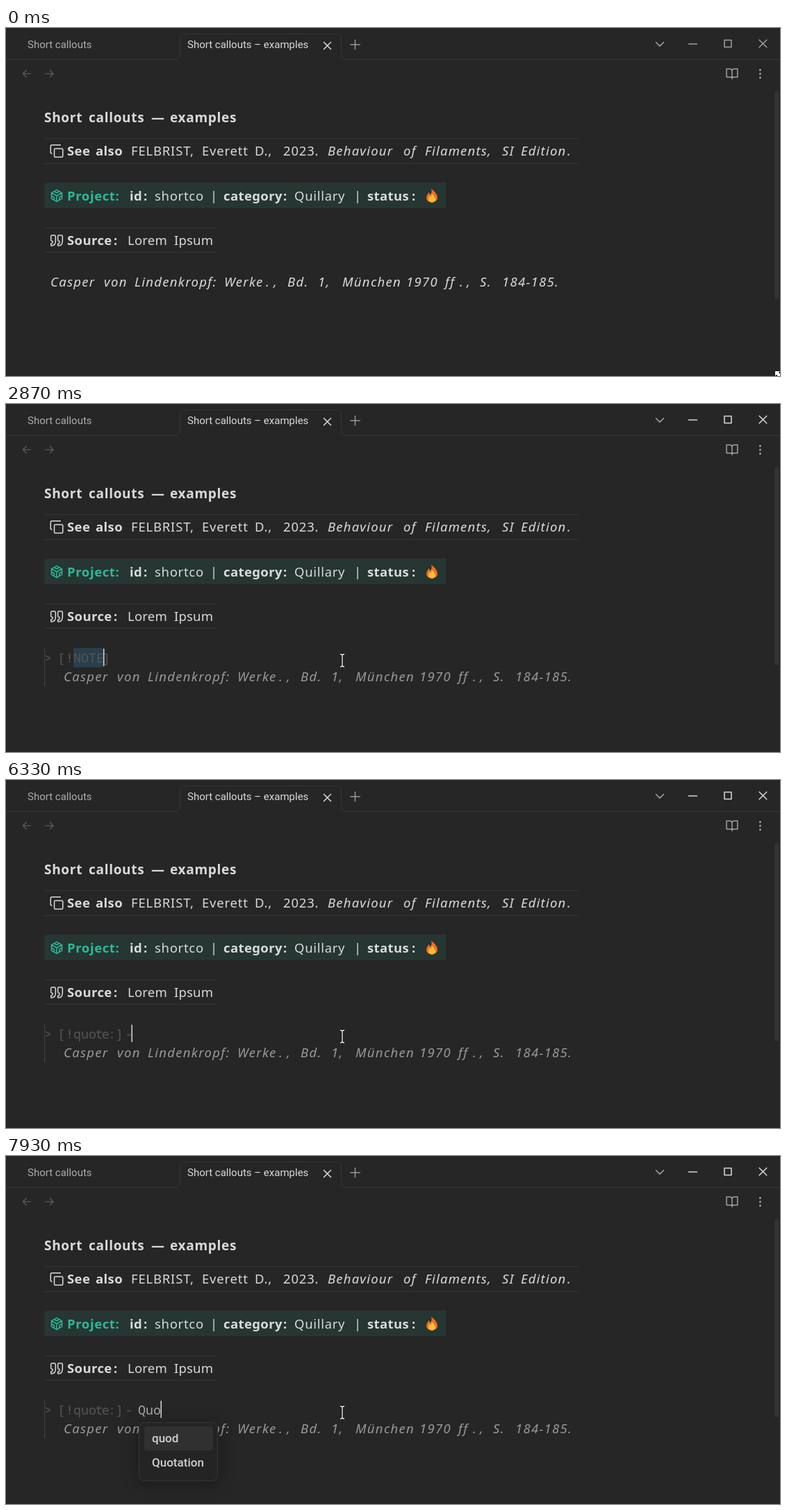
Write an HTML page with a canvas that moves like this. It is 1114 px wide and 502 px high and loops after 8 s.

```html
<!DOCTYPE html>
<html lang="en">
<head>
<meta charset="utf-8">
<title>Short callouts</title>
<style>
  html, body { margin: 0; width: 100%; height: 100%; overflow: hidden; background: #262626; }
  canvas { display: block; width: 1114px; height: 502px; }
</style>
</head>
<body>
<canvas id="stage" width="1114" height="502"></canvas>
<script>
const W = 1114, H = 502;
const stage = document.getElementById('stage').getContext('2d');
const layer = Object.assign(document.createElement('canvas'), { width: W, height: H }).getContext('2d');
let ctx = stage;

const LOOP = 8000, FRAME = 1000 / 15;

const SANS = '"Noto Sans", "Open Sans", sans-serif';
const MONO = '18.3px "Noto Sans Mono", "DejaVu Sans Mono", monospace';
const UI = 'Roboto, "Open Sans", sans-serif';
const BODY = '18.5px ' + SANS;
const BOLD = 'bold ' + BODY;
const ITALIC = 'italic ' + BODY;
const LIST = '500 17px ' + UI;

const BG = '#262626', TEXT = '#dadada', MUTED = '#999999', FAINT = '#555555';
const LINE = '#363636', TEAL = '#2eb89a', SELECT = '#293f4b';

// time, typed callout type, typed title, caret x
const TYPING = [
  [2870, 'NOTE', '', 140.5], [4130, 'q', '', 108], [4200, 'qu', '', 119],
  [4530, 'quo', '', 130], [4800, 'quot', '', 138], [4870, 'quote', '', 149],
  [5330, 'quote:', '', 159], [5930, 'quote:', '', 170], [6330, 'quote:', '', 181],
  [6600, 'quote:', '', 190], [7000, 'quote:', 'Q', 201], [7530, 'quote:', 'Qu', 212],
  [7800, 'quote:', 'Quo', 223]
];

const quoteMark = x => `M${x + 1} 21c3 0 7-1 7-8V5c0-1.25-.756-2-2-2H${x + 2}c-1.25 0-2 .75-2 2v6c0 1.25.75 2 2 2 1 0 1 0 1 1v1c0 1-1 2-2 2s-1 0-1 1v2c0 1 0 1 1 1z`;
const ICONS = {
  copy: 'M10 8H20a2 2 0 0 1 2 2V20a2 2 0 0 1-2 2H10a2 2 0 0 1-2-2V10a2 2 0 0 1 2-2zM4 16a2 2 0 0 1-2-2V4a2 2 0 0 1 2-2H18',
  box: 'M12 2L21 7V17L12 22L3 17V7ZM3 7L12 12L21 7M12 12V22M7.5 4.5L12 7L16.5 4.5M7.5 19.5V14.5L3 12M21 12L16.5 14.5V19.5',
  quote: quoteMark(2) + quoteMark(14),
  message: 'M21 15a2 2 0 0 1-2 2H7l-4 4V5a2 2 0 0 1 2-2H19a2 2 0 0 1 2 2ZM8 12a2 2 0 0 0 2-2V8H8M14 12a2 2 0 0 0 2-2V8H14',
  left: 'M20 12H4M11 5L4 12L11 19',
  right: 'M4 12H20M13 5L20 12L13 19',
  book: 'M2 3H8a4 4 0 0 1 4 4V21a3 3 0 0 0-3-3H2ZM22 3H16a4 4 0 0 0-4 4V21a3 3 0 0 1 3-3H22Z',
  tags: 'M9 5H2V12L8.3 18.3a2 2 0 0 0 2.5 0L15 14a2 2 0 0 0 0-3ZM6 9V9.01M15 5L21 11a3 3 0 0 1 0 4L17 19',
  cross: 'M4 4L20 20M20 4L4 20',
  plus: 'M12 2V22M2 12H22',
  chevron: 'M3 8L12 17L21 8',
  minus: 'M3 12H21',
  square: 'M4 4H20V20H4Z'
};

function text(str, x, y, font, color, gap = 0) {
  ctx.font = font;
  ctx.fillStyle = color;
  ctx.letterSpacing = gap + 'px';
  ctx.fillText(str, x, y);
}

const words = (list, y, font, color, gap, dx = 0) =>
  list.forEach(([x, str]) => text(str, x + dx, y, font, color, gap));

function rect(x, y, w, h, color) {
  ctx.fillStyle = color;
  ctx.fillRect(x, y, w, h);
}

function round(x, y, w, h, r, color) {
  ctx.beginPath();
  ctx.roundRect(x, y, w, h, r);
  ctx.fillStyle = color;
  ctx.fill();
}

function disc(x, y, r, color) {
  ctx.beginPath();
  ctx.arc(x, y, r, 0, 7);
  ctx.fillStyle = color;
  ctx.fill();
}

function icon(name, cx, cy, size, color, weight = 1.5) {
  const k = size / 24;
  ctx.save();
  ctx.translate(cx - size / 2, cy - size / 2);
  ctx.scale(k, k);
  ctx.strokeStyle = color;
  ctx.lineWidth = weight / k;
  ctx.lineCap = ctx.lineJoin = 'round';
  ctx.stroke(new Path2D(ICONS[name]));
  ctx.restore();
}

function shape(cx, cy, path, color) {
  ctx.save();
  ctx.translate(cx, cy);
  ctx.fillStyle = color;
  ctx.fill(new Path2D(path));
  ctx.restore();
}

// Paints on a separate layer, then blends it as one group.
function group(alpha, paint) {
  ctx = layer;
  ctx.clearRect(0, 0, W, H);
  ctx.save();
  paint();
  ctx.restore();
  ctx = stage;
  ctx.globalAlpha = alpha;
  ctx.drawImage(layer.canvas, 0, 0);
  ctx.globalAlpha = 1;
}

function drawWindow(t) {
  rect(0, 0, W, H, BG);
  ctx.strokeStyle = LINE;
  ctx.lineWidth = 1;
  ctx.stroke(new Path2D('M0 45.5H243Q250.5 45.5 250.5 38V16Q250.5 8.5 258 8.5H474Q482.5 8.5 482.5 16V38Q482.5 45.5 490 45.5H1114'));
  text('Short callouts', 31, 28.5, '15px ' + UI, '#ababab');
  text('Short callouts – examples', 261, 28.5, '15px ' + UI, TEXT);

  const control = t < 1200 ? '#a0a0a0' : TEXT;
  icon('cross', 462.5, 25.5, 15, TEXT);
  icon('plus', 502.5, 24, 16, MUTED);
  icon('chevron', 941, 23, 15, '#a0a0a0');
  icon('minus', 988.5, 23, 16, control);
  icon('square', 1039, 22.5, 15, control);
  icon('cross', 1089.5, 22.5, 16, control);
  icon('left', 30, 66, 17, FAINT);
  icon('right', 62.5, 66, 17, FAINT);
  icon('book', 1045, 66, 19, '#a0a0a0');
  for (const y of [60.5, 66, 71.5]) disc(1085.5, y, 1.5, '#a0a0a0');
  round(1106, 91, 6, t < 2870 ? 300 : 286, 3, '#333333');
}

function flame(x, y) {
  shape(x, y, 'M-1-10C5-6 8-1 8 3C8 7 4 9.5 0 9.5S-8 7-8 3C-8 0-6-3-4-5C-4-3-3-2-2-2C0-4 0-7-1-10Z', '#f26b21');
  shape(x, y, 'M0-3C3 0 5 2 5 5C5 8 2 9.5 0 9.5S-5 8-5 5C-5 3-4 1-3 0C-2 2-1 2 0-3Z', '#fdbd3f');
}

function drawNote() {
  words([[55, 'Short'], [119, 'callouts'], [209, '—'], [236, 'examples']], 135.5, 'bold 19px ' + SANS, TEXT, 0.7);

  for (const [y, w] of [[159, 769], [195, 769], [288, 249], [323, 249]]) rect(55, y, w, 1, LINE);
  icon('copy', 73, 177.5, 21, TEXT);
  words([[88, 'See'], [129, 'also']], 184, BOLD, TEXT, 0.4);
  words([[180, 'FELBRIST,'], [282, 'Everett'], [358, 'D.,'], [399, '2023.']], 184, BODY, TEXT, 0.8);
  words([[463, 'Behaviour'], [572, 'of'], [603, 'Filaments,'], [714, 'SI'], [741, 'Edition']], 184, ITALIC, TEXT, 1.2);
  text('.', 807, 184, BODY, TEXT);

  rect(55, 223, 578, 37, '#263632');
  icon('box', 73, 242, 20, TEAL);
  text('Project:', 88, 248.5, BOLD, TEAL, 0.6);
  words([[178, 'id'], [198, ':'], [313, 'category'], [399, ':'], [520, 'status'], [584, ':']], 248.5, BOLD, TEXT, 0.4);
  words([[214, 'shortco'], [294, '|'], [415, 'Quillary'], [501, '|']], 248.5, BODY, TEXT, 0.7);
  flame(613, 242);

  icon('quote', 73, 306.5, 20, TEXT);
  words([[88, 'Source'], [155, ':']], 312.5, BOLD, TEXT, 0.4);
  words([[175, 'Lorem'], [242, 'Ipsum']], 312.5, BODY, TEXT, 0.2);
}

const CITATION = [[64, 'Casper'], [141, 'von'], [185, 'Lindenkropf:'], [314, 'Werke'], [374, '.'], [385, ','],
  [405, 'Bd.'], [449, '1,'], [484, 'München'], [576, '1970'], [632, 'ff'], [653, '.'], [663, ','],
  [682, 'S.'], [714, '184-185.']];

const citation = (dx, y, color) => words(CITATION, y, ITALIC, color, 1.3, dx);

function caret(x, age) {
  if (age % 1200 < 600) rect(x - 0.5, 353, 1.5, 25, TEXT);
}

function drawPlain(t) {
  const raw = t >= 1330, all = t >= 1530;
  if (all) rect(55, 352, 770, 28, SELECT);
  if (raw) words([[64, '*'], [814, '*']], 373, 'italic ' + MONO, FAINT);
  citation(raw ? 11 : 0, 372.5, TEXT);
  if (t >= 1270) caret(all ? 824.5 : 482.5, t - (all ? 1530 : 1270));
}

function drawCallout(t) {
  const [since, kind, title, x] = TYPING.findLast(s => t >= s[0]);
  const code = (str, cx, color = FAINT) => text(str, cx, 372.5, MONO, color);
  rect(55, 352, 1, 55, '#434343');
  if (kind === 'NOTE') {
    rect(97, 352, 44, 28, SELECT);
    code(kind, 97);
  } else {
    code(kind.slice(0, 3), 97);
    [...kind.slice(3)].forEach((c, i) => code(c, 128.5 + i * 9.3));
  }
  code('>', 55);
  code('[', 74);
  code('!', 86);
  code(']', Math.min(x, 159) - 1);
  if (t >= 6330) code('-', 171.5);
  code(title, 190, '#aaaaaa');
  citation(19, 400, MUTED);
  caret(x, t - since);
}

function panel(x, y, w, h) {
  ctx.save();
  ctx.shadowColor = 'rgba(0,0,0,.3)';
  ctx.shadowBlur = 24;
  ctx.shadowOffsetY = 4;
  round(x, y, w, h, 8, '#242424');
  ctx.restore();
  ctx.strokeStyle = LINE;
  ctx.lineWidth = 1;
  ctx.beginPath();
  ctx.roundRect(x + 0.5, y + 0.5, w - 1, h - 1, 8);
  ctx.stroke();
}

function menu(x, y, w, items) {
  panel(x, y, w, 15 + items.length * 35);
  round(x + 8, y + 6, w - 15, 35, 4, '#303030');
  items.forEach(([name, mark], i) => {
    const cy = y + 23.5 + i * 35;
    if (mark) icon(mark, x + 29, cy, 15, '#b0b0b0', 1.2);
    text(name, x + (mark ? 45 : 19), cy + 5.5, LIST, '#d0d0d0');
  });
}

const letters = (str, font) => y => text(str, 380, y + 8, font, '#c8c8c8');
const EMOJI = {
  qatar: letters('QA', '500 14px ' + UI),
  squid(y) {
    shape(389, y, 'M0-9C5-6 5-2 4 1L8-1L6 4L9 8L4 6L3 9L0 6L-3 9L-4 6L-9 8L-6 4L-8-1L-4 1C-5-2-5-6 0-9Z', '#e0246e');
  },
  queen(y) {
    shape(389, y + 3, 'M-9-5L-5-1L-3-7L0-2L3-7L5-1L9-5L7 7H-7Z', '#f2a72e');
    rect(383, y + 7, 12, 1.5, '#a15f16');
  },
  quiet(y) {
    disc(389, y + 1, 9, '#f2a42e');
    rect(383, y - 2, 4, 1.5, '#6b431d');
    rect(391, y - 2, 4, 1.5, '#6b431d');
    shape(389, y + 4, 'M-5-1Q0-3 5-1L4 3Q0 5-4 3Z', '#a9651c');
  },
  iraq: letters('IQ', '15px "Noto Serif", serif'),
  question: y => text('?', 383.5, y + 8, '900 21px ' + UI, '#e8283d'),
  aquarius(y) {
    round(381, y - 7, 17, 17, 3, '#8a4fd0');
    ctx.strokeStyle = '#eeeeee';
    ctx.lineWidth = 1.5;
    for (const d of [-1, 4]) {
      ctx.beginPath();
      for (let i = 0; i < 7; i++) ctx.lineTo(383 + i * 2.1, y + d + (i % 2 ? -1.5 : 1.5));
      ctx.stroke();
    }
  },
  mosque(y) {
    shape(389, y, 'M-9 9V-4L-7.5-7L-6-4V2H-5Q-4-3 0-6Q4-3 5 2H6V-4L7.5-7L9-4V9H3V5Q0 1-3 5V9Z', '#c9a156');
    disc(389, y - 1, 3, '#e6a126');
  },
  bouquet(y) {
    shape(389, y, 'M-8 7Q-6-4 3-6L8 7Q1 10-8 7Z', '#3f9a55');
    disc(386, y, 3, '#e1457a');
    disc(392, y - 3, 3, '#ec6b8d');
    disc(392, y + 3, 2.5, '#f2b43a');
  },
  squirrel(y) {
    shape(389, y, 'M-7 9Q-9-7 1-7Q0 0 2 1L5-3L8 0L4 3V9Z', '#b8703c');
  },
  mosquito(y) {
    shape(389, y, 'M-8 7L0-1L-6-7L2-2L7-7L4 0L8 4L2 2L-2 7L0 2Z', '#8b9aa3');
  }
};

function emojiMenu(query) {
  const names = Object.keys(EMOJI).filter(n => n.includes(query)).slice(0, 9);
  panel(150, 12, 284, 335);
  ctx.beginPath();
  ctx.roundRect(150, 12, 284, 334, 8);
  ctx.clip();
  round(157, 19, 257, 37, 4, '#303030');
  round(424, 13, 8, 164, 4, '#323232');
  names.forEach((name, i) => {
    const y = 36 + i * 38, at = name.indexOf(query), end = at + query.length;
    let x = 171;
    [name.slice(0, at), query, name.slice(end)].forEach((part, k) => {
      text(part, x, y + 5.5, LIST, k === 1 ? '#858585' : '#dadada');
      x += ctx.measureText(part).width;
    });
    if (name === 'queen' || name === 'quiet') icon('tags', x + 14, y + 1, 17, '#999999', 1.2);
    EMOJI[name](y);
  });
}

const fade = age => Math.max(0, Math.min(1, 0.1 + 0.0075 * age));

function drawMenus(t, tick) {
  const quotes = [['Quote', 'quote'], ['Quote:', 'message']];
  const within = (from, to) => t >= from && t < to;
  if (within(4130, 4530)) group(fade(tick - 4133), () => menu(75, 226, 131, [['Question', 'message'], ...quotes]));
  else if (within(4530, 5400)) menu(75, 384, 115, quotes);
  else if (within(5400, 5930)) menu(75, 384, 115, quotes.slice(1));
  else if (within(7000, 7800)) group(fade(tick - 7000), () => emojiMenu(t < 7530 ? 'q' : 'qu'));
  else if (t >= 7800) group(fade(tick - 7800), () => menu(191, 384, 114, [['quod'], ['Quotation']]));
}

function outlined(path, x, y, line) {
  const p = new Path2D(path);
  ctx.save();
  ctx.translate(x, y);
  ctx.lineJoin = 'round';
  ctx.strokeStyle = '#111111';
  ctx.lineWidth = line ? 3 : 2;
  ctx.stroke(p);
  if (line) {
    ctx.strokeStyle = '#ffffff';
    ctx.lineWidth = 1.3;
    ctx.stroke(p);
  } else {
    ctx.fillStyle = '#ffffff';
    ctx.fill(p);
  }
  ctx.restore();
}

function drawPointer(t, tick) {
  if (t < 70) {
    outlined('M0 0H7L5 2L10 7L7 10L2 5L0 7Z', 1107, 495);
    return;
  }
  const p = Math.min(1, tick / 800), e = p * p * (3 - 2 * p);
  let x = 1111 - 625 * e;
  let y = 499 - 126 * e - 90 * e * Math.sin(Math.PI * e);
  if (t >= 1000) { x = 484; y = 370; }
  if (x > 1060) outlined('M0 0V16L4 12L7 18L9 17L7 11H12Z', x, y);
  else outlined('M-3-9Q0-9 0-7Q0-9 3-9M0-7V7M-3 9Q0 9 0 7Q0 9 3 9', x, y, true);
}

function draw(t) {
  const tick = Math.floor((t + 4) / FRAME) * FRAME;
  drawWindow(t);
  drawNote();
  if (t < 2870) drawPlain(t);
  else drawCallout(t);
  drawMenus(t, tick);
  drawPointer(t, tick);
}

const start = performance.now();
function loop(now) {
  draw(Math.max(0, now - start) % LOOP);
  requestAnimationFrame(loop);
}
draw(0);
requestAnimationFrame(loop);
</script>
</body>
</html>
```
